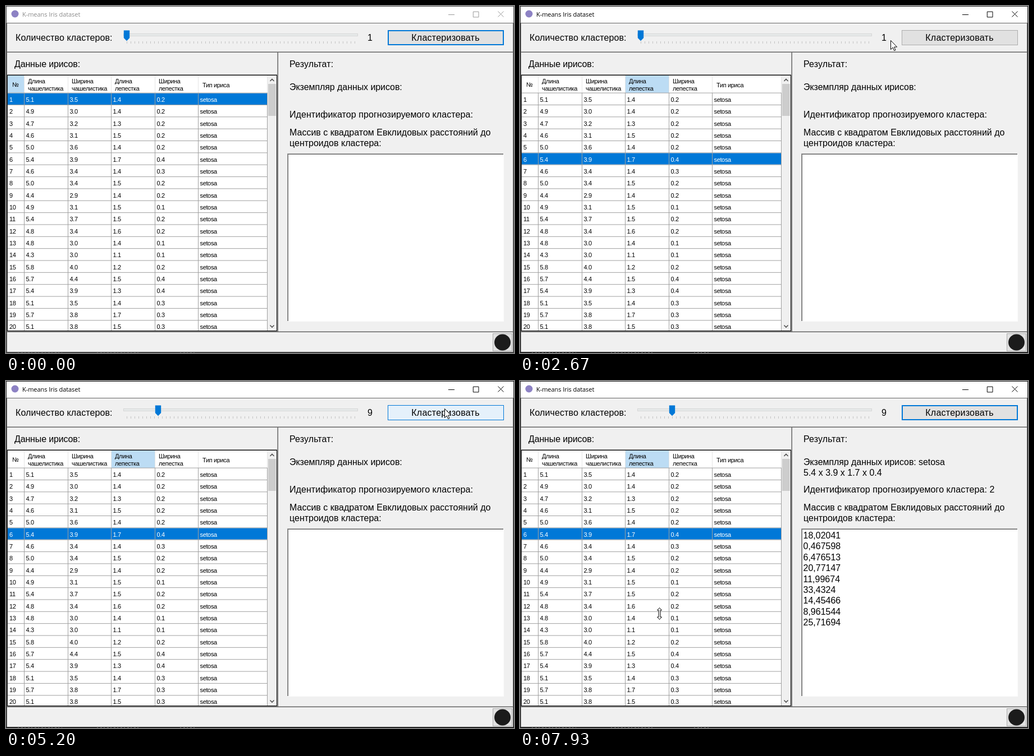
Animation of 905 by 619 pixels, one loop 8000 ms. Source, as an HTML page:

```html
<!DOCTYPE html>
<html lang="ru">
<head>
<meta charset="utf-8">
<title>K-means Iris dataset</title>
<style>
  html, body { margin: 0; width: 100%; height: 100%; overflow: hidden; background: #f0f0f0; }
  svg { display: block; }
  text { font: 16px "Liberation Sans", Arial, sans-serif; fill: #000; white-space: pre; }
  .small text { font-size: 11px; letter-spacing: -.35px; }
  text.title { font: 11px "Open Sans", sans-serif; letter-spacing: -.05px; }
  .current text { fill: #fff; }
</style>
</head>
<body>
<template id="samples">
5.1 3.5 1.4 0.2
4.9 3.0 1.4 0.2
4.7 3.2 1.3 0.2
4.6 3.1 1.5 0.2
5.0 3.6 1.4 0.2
5.4 3.9 1.7 0.4
4.6 3.4 1.4 0.3
5.0 3.4 1.5 0.2
4.4 2.9 1.4 0.2
4.9 3.1 1.5 0.1
5.4 3.7 1.5 0.2
4.8 3.4 1.6 0.2
4.8 3.0 1.4 0.1
4.3 3.0 1.1 0.1
5.8 4.0 1.2 0.2
5.7 4.4 1.5 0.4
5.4 3.9 1.3 0.4
5.1 3.5 1.4 0.3
5.7 3.8 1.7 0.3
5.1 3.8 1.5 0.3
</template>
<template id="distances">
18,02041
0,467598
6,476513
20,77147
11,99674
33,4324
14,45466
8,961544
25,71694
</template>
<script>
const LOOP = 8000, FPS = 15;
const BLUE = '#0078d7', PANEL = '#646464', FACE = '#f0f0f0', LINE = '#a0a0a0';
const NS = 'http://www.w3.org/2000/svg';

function set(node, attrs) {
  for (const key in attrs) node.setAttribute(key, attrs[key]);
  return node;
}
function add(parent, tag, attrs) {
  return parent.appendChild(set(document.createElementNS(NS, tag), attrs));
}
const svg = add(document.body, 'svg', { width: 905, height: 619, viewBox: '0 0 905 619' });

function rect(x, y, width, height, fill, parent = svg) {
  return add(parent, 'rect', { x, y, width, height, fill });
}
function path(d, stroke, fill = 'none', parent = svg) {
  return add(parent, 'path', { d, stroke, fill });
}
function text(x, y, content, parent = svg, spacing = 0) {
  const node = add(parent, 'text', { x, y });
  if (spacing) node.style.letterSpacing = spacing + 'px';
  node.textContent = content;
  return node;
}
const show = (node, on) => node.setAttribute('visibility', on ? 'visible' : 'hidden');
const linesOf = id => document.getElementById(id).innerHTML.trim().split('\n');

// Window frame and title bar
const frame = rect(0, 0, 905, 619, '#333');
rect(1, 1, 903, 29, '#fff');
rect(1, 30, 903, 587, PANEL);
rect(2, 31, 901, 50.5, FACE);
rect(2, 83, 481.5, 497.5, FACE);
rect(485, 83, 418, 497.5, FACE);
rect(2, 582, 901, 35, FACE);
set(path('M21 618.5H100M162 618.5H238M310 618.5H340', '#777'), { 'stroke-dasharray': '2 4 3 3' });
add(svg, 'circle', { cx: 16, cy: 14, r: 6.5, fill: '#8d82c4' });
const title = text(29, 19, 'K-means Iris dataset');
title.setAttribute('class', 'title');
const controls = path('M788 15.5H799M832.3 10.2h9.7v9.7h-9.7ZM876.5 9.5l10 10m0 -10l-10 10', '#000');

// Slider
text(17, 62, 'Количество кластеров:', svg, .1);
set(rect(209.5, 49.5, 417, 4, '#e7eaea'), { stroke: '#d6d6d6' });
set(path('M215 65H622', '#c4c4c4'), { 'stroke-width': 4, 'stroke-dasharray': '1 6' });
const thumb = path('M0 43.5h10.4v13.5l-5.2 5.3 -5.2 -5.3Z', 'none', BLUE);
const count = text(644, 62, '1');

// Cluster button
const button = rect(0, 0, 0, 0, '#e1e1e1');
const caption = text(783, 62, 'Кластеризовать', svg, .25);
caption.setAttribute('text-anchor', 'middle');

// Table
const ROW = 21.35;
const rowTop = i => 155.6 + ROW * i;
const columns = [32, 110, 187, 265, 342, 465];

text(15, 109, 'Данные ирисов:', svg, -.15);
rect(2, 122.6, 481, 457.6, '#000');
rect(3, 124, 479, 455, '#fff');
const headMark = rect(3, 124, 29, 31, '#bcdcf4');
const rowMark = rect(3, 0, 462, ROW - 1, BLUE);
const grid = add(svg, 'g', { class: 'small' });

for (const x of columns) {
  rect(x, 124, 1, 31, '#e5e5e5', grid);
  rect(x, 155, 1, 424, LINE, grid);
}
text(11, 144, '№', grid);
['Длина чашелистика', 'Ширина чашелистика', 'Длина лепестка', 'Ширина лепестка'].forEach((head, i) =>
  head.split(' ').forEach((word, j) => text(columns[i] + 7, 138 + 12.5 * j, word, grid)));
text(350, 145, 'Тип ириса', grid);

const rows = linesOf('samples').map((line, i) => {
  rect(3, rowTop(i) - 1, 463, 1, LINE, grid);
  const row = add(grid, 'g', {});
  [i + 1, ...line.split(' '), 'setosa'].forEach((cell, j) =>
    text(j ? columns[j - 1] + 3.5 : 6, Math.round(rowTop(i) + 15.2), cell, row));
  return row;
});

// Scroll bar
rect(466, 124, 16, 455, FACE);
rect(467, 139, 14, 57, '#cdcdcd');
set(path('M470.5 134l3.5 -3.5 3.5 3.5M470.5 569.5l3.5 3.5 3.5 -3.5', '#505050'), { 'stroke-width': 1.6 });

// Result panel
text(505, 109, 'Результат:', svg, .1);
const sample = text(505, 150, '', svg, -.07);
const size = text(505, 169, '5.4 x 3.9 x 1.7 x 0.4');
const cluster = text(505, 199, '', svg, .07);
text(505, 231, 'Массив с квадратом Евклидовых расстояний до');
text(505, 250, 'центроидов кластера:');
rect(501, 263, 386, 300, '#fbfbfb');
rect(501, 263, 385, 299, LINE);
rect(502, 264, 384, 298, '#696969');
rect(503, 265, 383, 297, '#fff');
const distances = add(svg, 'g', {});
linesOf('distances').forEach((line, i) => text(504.5, 281 + 19.4 * i, line, distances));

// Footer button
set(rect(867.5, 584.5, 34, 31, '#e1e1e1'), { stroke: '#adadad' });
add(svg, 'circle', { cx: 884.5, cy: 600, r: 14.5, fill: '#1b1b1b' });

// Pointer shapes
const pointer = add(svg, 'g', {});
const shapes = {
  arrow: path('M.5 .5V16.5L4.2 13 6.7 18.6 9 17.6 6.6 12.1H11.6Z', '#000', '#fff', pointer),
  resize: path('M.5 -10.5l4 4.5h-2.5v12h2.5l-4 4.5 -4 -4.5h2.5v-12h-2.5Z', '#000', '#fff', pointer),
  beam: path('M-3.5 -7.5h7m-3 0v15m-4 0h7', '#000', 'none', pointer)
};

// Pointer moves: first tick, last tick, x, y; it rests in between
const moves = [
  [5, 5, 0, 24], [5, 11, 179, 100], [11, 17, 77, 209], [17, 20, 289, 232], [21, 24, 234, 267],
  [31, 38, 720, 52], [39, 40, 660, 61], [40, 48, 217, 55], [53, 62, 273, 55],
  [63, 70, 783, 69], [70, 71, 781, 49], [97, 99, 732, 118], [99, 104, 535, 393],
  [105, 113, 420, 59], [113, 119, 248, 415]
];
const T = { enter: 5, activate: 27, select: 28, grab: 53, drop: 64, press: 76, release: 78, result: 91 };
const ease = k => k * k * (3 - 2 * k);

function locate(tick) {
  let x = 0, y = 0;
  for (const [from, to, nextX, nextY] of moves) {
    if (tick < from) break;
    const k = tick < to ? ease((tick - from) / (to - from)) : 1;
    x += (nextX - x) * k;
    y += (nextY - y) * k;
  }
  return [Math.round(x), Math.round(y)];
}
const inside = (x, y, x0, y0, x1, y1) => x >= x0 && x < x1 && y >= y0 && y < y1;

function pointerShape(x, y) {
  if (inside(x, y, 502, 264, 887, 562)) return 'beam';
  const offset = (y - rowTop(0)) % ROW;
  const onEdge = offset < 3.2 || offset > ROW - 3;
  return onEdge && inside(x, y, 3, 159, 465, 579) ? 'resize' : 'arrow';
}

function drawButton(hot, pressed, focused) {
  const w = focused && !hot && !pressed ? 2 : 1;
  set(button, {
    x: 680 + w / 2, y: 43 + w / 2, width: 207 - w, height: 27 - w, 'stroke-width': w,
    fill: pressed ? '#cce4f7' : hot ? '#e5f1fb' : '#e1e1e1',
    stroke: pressed ? '#005499' : hot || focused ? BLUE : '#adadad'
  });
}

function draw(tick) {
  const [x, y] = locate(tick);
  const active = tick >= T.activate, selected = tick >= T.select, done = tick >= T.result;

  frame.setAttribute('fill', active ? '#222' : '#444');
  title.style.fill = active ? '#000' : '#8c8c8c';
  controls.setAttribute('stroke', active ? '#000' : '#999');

  const current = selected ? 5 : 0;
  set(headMark, selected ? { x: 188, width: 77 } : { x: 3, width: 29 });
  rowMark.setAttribute('y', rowTop(current));
  rows.forEach((row, i) => row.setAttribute('class', i === current ? 'current' : ''));

  const held = tick >= T.grab && tick < T.drop;
  const value = held ? 1 + Math.round((x - 217) / 7) : tick < T.grab ? 1 : 9;
  const left = 209.8 + 7 * (value - 1);
  const over = tick >= T.enter && inside(x, y, left, 43, left + 11, 62);
  set(thumb, { transform: `translate(${left})`, fill: held ? '#ccc' : over ? '#171717' : BLUE });
  count.textContent = value;

  drawButton(inside(x, y, 680, 43, 887, 68), tick >= T.press && tick < T.release,
    !selected || tick >= T.press);

  sample.textContent = 'Экземпляр данных ирисов:' + (done ? ' setosa' : '');
  cluster.textContent = 'Идентификатор прогнозируемого кластера:' + (done ? ' 2' : '');
  show(size, done);
  show(distances, done);

  const kind = pointerShape(x, y);
  pointer.setAttribute('transform', `translate(${x} ${y})`);
  for (const name in shapes) show(shapes[name], tick >= T.enter && name === kind);
}

const start = performance.now();
let last = -1;
function loop() {
  const t = (performance.now() - start) % LOOP;
  const tick = Math.floor((t + 5) * FPS / 1000) % (LOOP * FPS / 1000);
  if (tick !== last) draw(last = tick);
  requestAnimationFrame(loop);
}
loop();
</script>
</body>
</html>
```
